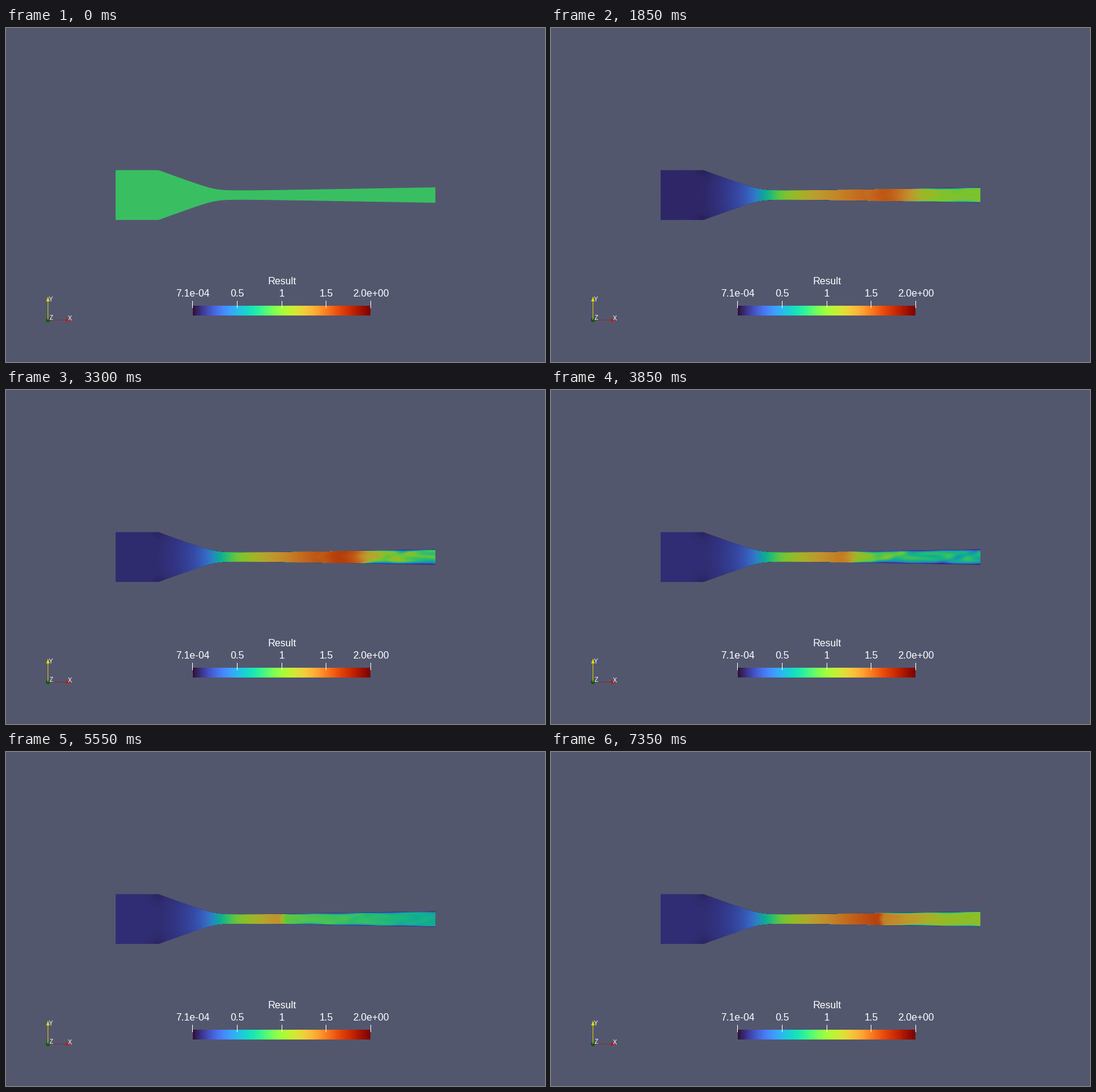
A matplotlib script that plays this animation: 880x546 px, repeating every 7400 ms.

```python
import numpy as np
import matplotlib.pyplot as plt
from matplotlib.animation import FuncAnimation
from matplotlib.patches import Circle, Polygon

W, H, DPI = 880, 546, 100
FRAMES, STEP = 148, 50
PX = 72 / DPI
SHADE = 0.77
VMAX = 2.0
START = 0.81
CY = 273.1
LEFT, RIGHT = 179, 701
turbo = plt.get_cmap("turbo")


def half_height(x):
    """Straight chamber, cone, rounded throat, slowly widening duct."""
    cone = 40.7 - .366 * (x - 248)
    duct = 6.9 + .018 * (x - 388)
    blend = (cone + duct) / 2 + np.sqrt((cone - duct) ** 2 / 4 + 14)
    return np.minimum(40.7, blend)


def area_ratio(m):
    return ((1 + .2 * m ** 2) / 1.2) ** 3 / m


# Mach number along the axis from the isentropic area relation
axis = np.linspace(LEFT, RIGHT, 2000)
ratio = half_height(axis)
throat = axis[ratio.argmin()]
ratio = ratio / ratio.min()
slow, fast = np.linspace(.05, 1, 2000), np.linspace(1, 2.5, 2000)
mach = np.where(axis < throat,
                np.interp(-ratio, -area_ratio(slow), slow),
                np.interp(ratio, area_ratio(fast), fast))

x0, x1, y0, y1 = 178, 703, 231, 316
X, Y = np.meshgrid(np.arange(x0, x1) + .5, np.arange(y0, y1) + .5)
Y = Y - CY
SIDE = np.sign(Y)
HALF = half_height(X)
GAP = np.maximum(HALF - abs(Y), 0)
ALPHA = np.clip(HALF - abs(Y) + .5, 0, 1) * ((X > LEFT) & (X < RIGHT))
BASE = np.interp(X - Y ** 2 / 150, axis, mach)
CORNER = np.exp(-((X - 248) ** 2 + (abs(Y) - 41) ** 2) / 90)
CHAMBER = np.clip((300 - X) / 60, 0, 1)


def bump(t, mid, width):
    return np.exp(-((t - mid) / width) ** 2)


def ease(u):
    u = np.clip(u, 0, 1)
    return u * u * (3 - 2 * u)


def swirl(t):
    u = X - .08 * t
    bend = 1.6 * np.sin(u / 19 + Y / 6)
    return (.6 * np.sin(u / 12 + bend + Y / 5)
            + .4 * np.sin(u / 7.3 - Y / 3.1 + 1.3 * bend))


def field(t):
    young = bump(t, 0, 1500)          # start-up
    surge = bump(t, 2600, 950)        # shock driven towards the exit
    wake = bump(t, 3500, 1100)        # separated flow behind it
    late = ease((t - 5500) / 1850)    # second advance
    pull = np.sqrt(surge)

    shock = 450 + 218 * surge + 55 * young + 88 * late
    width = 4 + 30 * young + 60 * surge * (1 - surge)
    after = .9 + .3 * pull + .48 * late
    outlet = .62 + .75 * surge ** 2 + .6 * young + .43 * late
    reach = 170 - 150 * pull - 90 * late
    dx = X - shock

    # Ahead of the shock
    up = np.where(BASE > 1.2, 1.2 + (BASE - 1.2) * (1 - .9 * young), BASE)
    blot = np.sin(X / 9 + 2 * np.sin(Y / 13 + t / 300)) * np.cos(Y / 11)
    up = up - young * CHAMBER * (.085 - .015 * blot) - .03 * CORNER
    phase = dx + 74 - abs(Y + 1)
    cells = .1 + .09 * np.sin(phase * 2 * np.pi / 45)
    up = up - surge ** 3 * cells * ease(phase / 6)

    # Behind the shock
    down = outlet + (after - outlet) * np.exp(-(np.maximum(dx, 0) / reach) ** 2)
    grow = .4 + .6 * np.clip(dx / 70, 0, 1)
    down = down + (.03 + .13 * wake) * grow * swirl(t)
    front = .5 + .5 * np.tanh((dx - .04 * Y ** 2) / width)
    v = up + (down - up) * front

    # Slow layer along both walls, thicker below
    thick = 1.2 + 1.4 * wake - .9 * young
    thick = thick * np.clip((X - min(shock, 585) + 5) / 50, 0, 1)
    thick = thick * (1 + .4 * wake ** 2 * SIDE)
    thick = thick * (1 + .35 * np.sin((X - .06 * t) / 13 + 2 * SIDE))
    v = v * (1 - .9 * np.exp(-(GAP / (thick + .05)) ** 1.5))

    return START + (v - START) * (1 - np.exp(-t / 180))


def paint(t):
    rgba = turbo(np.clip(field(t) / VMAX, 0, 1))
    rgba[..., :3] *= SHADE
    rgba[..., 3] = ALPHA
    return rgba


fig = plt.figure(figsize=(W / DPI, H / DPI), dpi=DPI, facecolor="#52576e")
ax = fig.add_axes([0, 0, 1, 1])
ax.axis("off")


def line(xs, ys, color):
    ax.plot(xs, ys, color=color, lw=PX, solid_capstyle="butt", snap=False)


def label(x, y, text, size=16.2):
    ax.text(x, y, text, color="white", fontsize=size * PX, ha="center",
            va="baseline", family="Liberation Sans")


def arrow(points, color):
    ax.add_patch(Polygon(points, color=color, lw=0))


nozzle = ax.imshow(paint(0), extent=(x0, x1, y1, y0), interpolation="nearest")

# Colour legend
ax.imshow(np.linspace(0, 1, 290)[None], cmap=turbo, extent=(305, 595, 470, 454),
          interpolation="nearest", aspect="auto")
label(451, 419, "Result")
names = ["7.1e-04", "0.5", "1", "1.5", "2.0e+00"]
for x, text in zip(np.linspace(304.5, 595.5, 5), names):
    line([np.floor(x) + .5] * 2, [446, 458], "white")
    label(x + .5, 439, text)

# Axis triad
line([68.5, 68.5], [477, 446], "#d8d000")
line([71, 99], [477.5, 477.5], "#8a2a35")
arrow([(68.5, 439), (65.8, 447), (71.2, 447)], "#e6de00")
arrow([(106, 477.5), (98.5, 474.8), (98.5, 480.2)], "#dd0000")
ax.add_patch(Circle((68.5, 477.5), 3.4, color="#0a5a0a", lw=0))
label(73.5, 447, "Y", 10)
label(74, 477, "Z", 10)
label(104, 478, "X", 10)

ax.set_xlim(0, W)
ax.set_ylim(H, 0)
ax.set_aspect("auto")


def update(i):
    nozzle.set_data(paint(i * STEP))
    return [nozzle]


anim = FuncAnimation(fig, update, frames=FRAMES, interval=STEP, repeat=True,
                     repeat_delay=0, blit=False)
plt.show()
```
